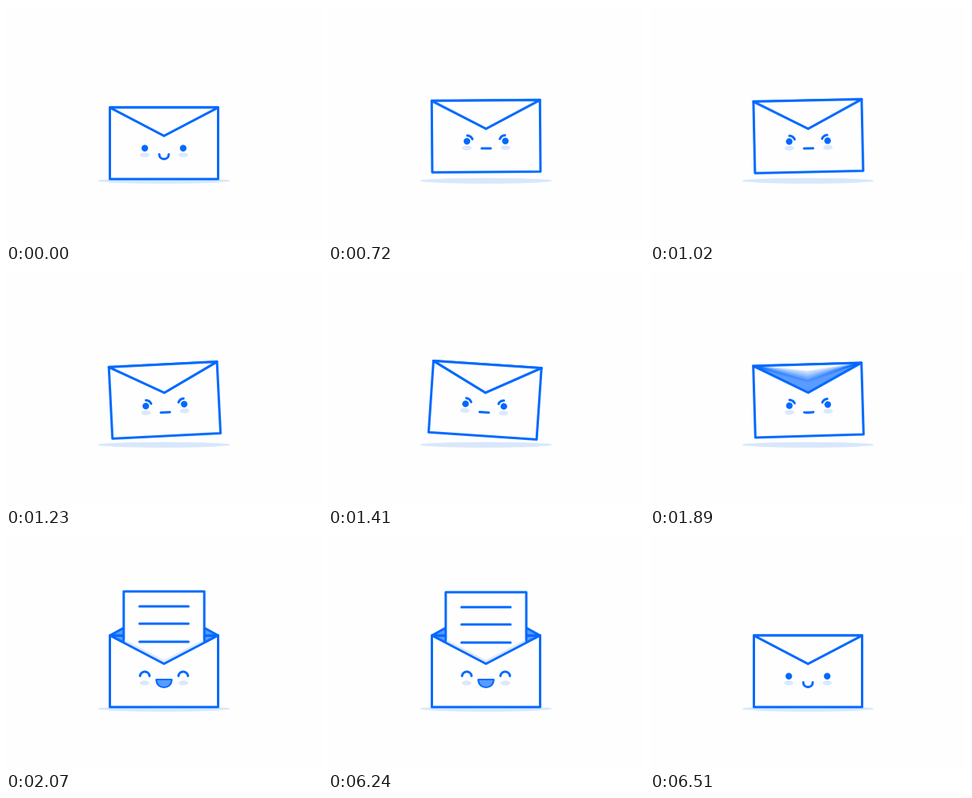
Recreate the animation shown at these times as an HTML page with a canvas. Size 400 px wide and 300 px high, loop 7.17 s.

```html
<!DOCTYPE html>
<html lang="en">
<head>
<meta charset="utf-8">
<title>Envelope</title>
<style>
html, body { margin: 0; width: 100%; height: 100%; overflow: hidden; background: #fefefe; }
canvas { display: block; }
</style>
</head>
<body>
<canvas id="stage" width="400" height="300"></canvas>
<script>
const LOOP = 7170, STEP = 30, SHUTTER = 15, SAMPLES = 5;
const BLUE = '#0069ff', MID = '#5a9bff', PALE = '#dbe8fd', WHITE = '#fefefe';

const view = document.getElementById('stage').getContext('2d');
const buffer = document.createElement('canvas');
buffer.width = 400;
buffer.height = 300;
const c = buffer.getContext('2d');
c.lineCap = c.lineJoin = 'round';

const mix = (a, b, p) => a + (b - a) * p;
const ramp = (t, a, b) => Math.min(1, Math.max(0, (t - a) / (b - a)));
const smooth = (t, a, b) => { const p = ramp(t, a, b); return p * p * (3 - 2 * p); };

function paint(fill, stroke, width = 3) {
  if (fill) { c.fillStyle = fill; c.fill(); }
  if (stroke) { c.strokeStyle = stroke; c.lineWidth = width; c.stroke(); }
}

function poly(points, fill, stroke, close = true) {
  c.beginPath();
  points.forEach(([x, y]) => c.lineTo(x, y));
  if (close) c.closePath();
  paint(fill, stroke);
}

function oval(x, y, rx, ry, fill) {
  c.beginPath();
  c.ellipse(x, y, rx, ry, 0, 0, 7);
  paint(fill);
}

function arc(x, y, r, from, to) {
  c.beginPath();
  c.arc(x, y, r, from, to);
  paint(null, BLUE);
}

function pose(t) {
  const shake = smooth(t, 560, 740) - smooth(t, 1830, 1950);
  const rise = mix(95, -5.5, smooth(t, 1890, 2015));
  const settle = 5.5 * smooth(t, 2015, 2068);
  const drop = 95 * ramp(t, 6225, 6435) ** 2;
  return {
    lift: 9 * (smooth(t, 530, 700) - smooth(t, 1905, 1995)),
    angle: 4 * shake * Math.sin((t - 1041.5) / 310 * 2 * Math.PI) * Math.PI / 180,
    letter: Math.min(95, rise + settle + drop),
    open: smooth(t, 1860, 1965) - smooth(t, 6370, 6510),
    angry: smooth(t, 540, 680) - smooth(t, 1890, 1950),
    happy: smooth(t, 1890, 1980) - smooth(t, 6290, 6420)
  };
}

function drawLetter(y) {
  c.save();
  c.beginPath();
  c.rect(100, 0, 200, 200);
  c.clip();
  const top = 73 + y;
  poly([[149, top], [251, top], [251, top + 140], [149, top + 140]], WHITE, BLUE);
  for (const row of [92, 114, 137]) poly([[169, row + y], [231, row + y]], null, BLUE, false);
  // shade cast by the pocket edge
  c.beginPath();
  c.rect(150.5, top + 1.5, 99, 140);
  c.clip();
  poly([[131, 126], [200, 162], [269, 126]], null, PALE, false);
  c.restore();
}

function drawMouth(angry, happy) {
  const blend = (smile, flat, laugh) => mix(mix(smile, flat, angry), laugh, happy);
  const w = blend(6, 5.7, 9.8), y = blend(188.5, 190, 185);
  const upper = y + blend(8, 0, 0), lower = y + blend(8, 0, 13.4);
  c.beginPath();
  c.moveTo(200 - w, y);
  c.bezierCurveTo(200 - w, lower, 200 + w, lower, 200 + w, y);
  c.bezierCurveTo(200 + w, upper, 200 - w, upper, 200 - w, y);
  paint(happy > 0 ? MID : null, BLUE, mix(3, 2, happy));
}

function drawFace({ angry, happy }) {
  for (const side of [-1, 1]) {
    c.save();
    c.translate(200, 0);
    c.scale(-side, 1);
    oval(-24.5, 189.3, 6, 3, PALE);
    if (happy > 0.5) arc(-24.3, 181, 6, Math.PI * 1.03, Math.PI * 1.97);
    else oval(-24.3, 180.8, 4.2, 4.2, BLUE);
    if (angry > 0.05) arc(-24.3, 181, 7.5, -1.5, mix(-1.5, -0.4, angry));
    c.restore();
  }
  drawMouth(angry, happy);
}

function drawScene(t) {
  const p = pose(t);
  c.fillStyle = WHITE;
  c.fillRect(0, 0, 400, 300);
  oval(200, 222.2, 83.5, 3.5, '#d8e7fc');
  c.save();
  c.translate(200, 156.5 - p.lift);
  c.rotate(p.angle);
  c.translate(-200, -156.5);

  const left = [131.5, 129], right = [268.5, 129], fold = [200, 165];
  const flap = [left, [200, mix(165, 91, p.open)], right];
  const folded = p.open < 0.49;
  poly([left, fold, right], MID, BLUE);
  if (!folded) poly(flap, MID, BLUE);
  if (p.letter < 95) drawLetter(p.letter);
  poly([left, fold, right, [268.5, 220], [131.5, 220]], WHITE, BLUE);
  if (folded) poly(flap, WHITE, BLUE);
  drawFace(p);
  c.restore();
}

// Averages a few moments within each step for motion blur.
function render(now) {
  const t = Math.floor(now % LOOP / STEP) * STEP;
  const moving = (t >= 510 && t < 2070) || (t >= 6210 && t < 6510);
  const count = moving ? SAMPLES : 1;
  for (let i = 0; i < count; i++) {
    drawScene(t + SHUTTER * i / count);
    view.globalAlpha = 1 / (i + 1);
    view.drawImage(buffer, 0, 0);
  }
}

const start = performance.now();
function tick() {
  render(performance.now() - start);
  requestAnimationFrame(tick);
}
tick();
</script>
</body>
</html>
```
